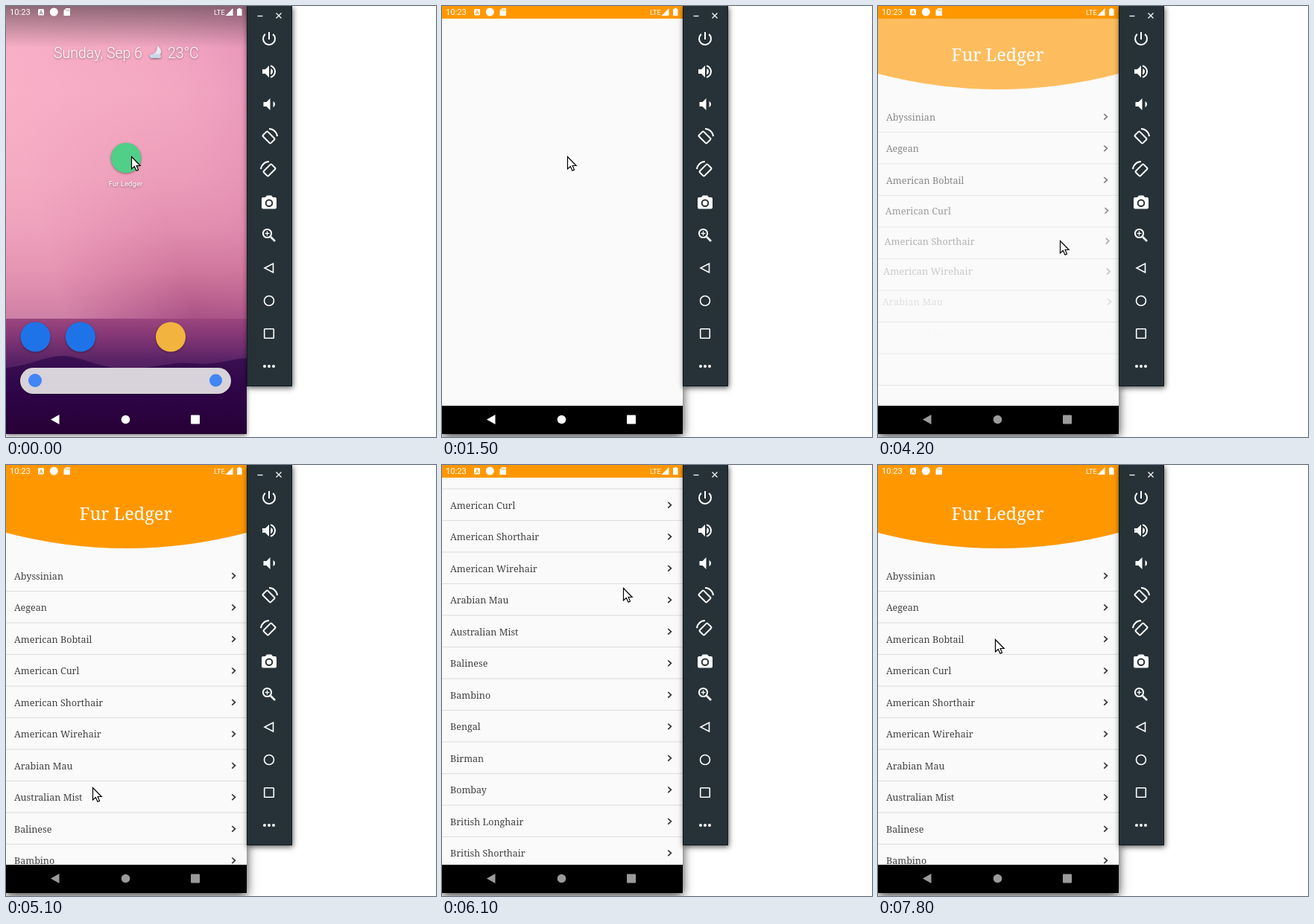
An HTML page with a canvas for the animation above (8000 ms loop, 577 by 579 pixels).

```html
<!DOCTYPE html>
<html lang="en">
<head>
<meta charset="utf-8">
<title>Breed list demo</title>
<style>
  html, body { margin: 0; width: 100%; height: 100%; overflow: hidden; background: #fff; }
  canvas { display: block; }
</style>
</head>
<body>
<canvas id="stage" width="577" height="579"></canvas>
<script>
const ctx = document.getElementById('stage').getContext('2d');
const LOOP = 8000, STEP = 100;
const W = 323, H = 575, BAR = 17, NAV = 537, ROW = 42.5;
const ORANGE = '#ff9800', PAPER = '#fafafa', SLATE = '#263238';
const TITLE = 'Fur Ledger';
const SANS = 'Roboto, sans-serif', SERIF = '"Noto Serif", serif';
const BREEDS = ['Abyssinian', 'Aegean', 'American Bobtail', 'American Curl', 'American Shorthair',
  'American Wirehair', 'Arabian Mau', 'Australian Mist', 'Balinese', 'Bambino', 'Bengal', 'Birman',
  'Bombay', 'British Longhair', 'British Shorthair', 'Burmese'];

// Keyframes: [time, value, ...]
const POINTER = [[1900, 168, 202], [2800, 244, 315], [4600, 244, 315], [5100, 116, 433],
  [5500, 116, 433], [5700, 190, 385], [6100, 243, 165], [6300, 243, 165],
  [6500, 235, 192], [7100, 163, 417], [7300, 163, 417], [7800, 157, 234]];
const SCROLL = [[5600, 0], [6100, 222.5], [6200, 224], [6300, 224], [7000, 0]];

const clamp = v => Math.max(0, Math.min(1, v));
const span = (t, from, to) => clamp((t - from) / (to - from));
const mix = (a, b, p) => a + (b - a) * p;
const smooth = p => p * p * (3 - 2 * p);
const easeOut = p => 1 - (1 - p) * (1 - p);

function track(keys, t) {
  let a = keys[0], b = a;
  for (const k of keys) {
    b = k;
    if (k[0] > t) break;
    a = k;
  }
  const p = a === b ? 0 : smooth(span(t, a[0], b[0]));
  return a.slice(1).map((v, i) => mix(v, b[i + 1], p));
}

// Cubic bezier (.4, 0, .2, 1)
function fastOutSlowIn(x) {
  let lo = 0, hi = 1;
  for (let i = 0; i < 20; i++) {
    const s = (lo + hi) / 2, r = 1 - s;
    if (3 * r * r * s * 0.4 + 3 * r * s * s * 0.2 + s * s * s < x) lo = s; else hi = s;
  }
  return lo * lo * (3 - 2 * lo);
}

function group(draw, x = 0, y = 0) {
  ctx.save();
  ctx.translate(x, y);
  draw();
  ctx.restore();
}
function rect(x, y, w, h, fill) {
  ctx.fillStyle = fill;
  ctx.fillRect(x, y, w, h);
}
function round(x, y, w, h, r) {
  ctx.beginPath();
  ctx.roundRect(x, y, w, h, r);
}
function disc(x, y, r, fill) {
  ctx.beginPath();
  ctx.arc(x, y, r, 0, 7);
  ctx.fillStyle = fill;
  ctx.fill();
}
function arc(x, y, r, from, to) {
  ctx.beginPath();
  ctx.arc(x, y, r, from * Math.PI / 180, to * Math.PI / 180);
  ctx.stroke();
}
function poly(pts, closed = true) {
  ctx.beginPath();
  for (let i = 0; i < pts.length; i += 2) ctx.lineTo(pts[i], pts[i + 1]);
  if (closed) ctx.closePath();
}
function fillPoly(...pts) { poly(pts); ctx.fill(); }
function line(...pts) { poly(pts, false); ctx.stroke(); }
function text(s, x, y, font, fill, align = 'left') {
  ctx.font = font;
  ctx.fillStyle = fill;
  ctx.textAlign = align;
  ctx.fillText(s, x, y);
}
function shade(color, blur, dx = 0, dy = 0) {
  ctx.shadowColor = color;
  ctx.shadowBlur = blur;
  ctx.shadowOffsetX = dx;
  ctx.shadowOffsetY = dy;
}
function gradient(x0, y0, x1, y1, stops) {
  const g = ctx.createLinearGradient(x0, y0, x1, y1);
  stops.forEach(([at, color]) => g.addColorStop(at, color));
  return g;
}

function wallpaper() {
  rect(0, 0, W, H, gradient(0, 0, 0, H, [[0, '#f2a6c1'], [0.2, '#f4a9c2'], [0.4, '#ea9bb7'],
    [0.52, '#de8aab'], [0.62, '#cb7097'], [0.7, '#ac5184'], [0.77, '#863776'], [0.83, '#572365'], [1, '#30094a']]));
  rect(0, 0, W, 420, gradient(0, 130, W, 40, [[0, 'rgba(255,185,205,.5)'], [0.5, 'rgba(255,180,205,.1)'],
    [1, 'rgba(205,110,165,.3)']]));
  rect(0, 0, W, 56, gradient(0, 0, 0, 56, [[0, 'rgba(60,50,55,.55)'], [1, 'rgba(60,50,55,0)']]));
  ctx.beginPath();
  ctx.moveTo(0, 486);
  ctx.bezierCurveTo(35, 482, 55, 470, 76, 470);
  ctx.bezierCurveTo(105, 471, 120, 486, 160, 487);
  ctx.bezierCurveTo(205, 487, 220, 477, 250, 480);
  ctx.bezierCurveTo(285, 483, 300, 474, W, 473);
  ctx.lineTo(W, H);
  ctx.lineTo(0, H);
  ctx.fillStyle = gradient(0, 470, 0, H, [[0, '#3b1152'], [0.4, '#30054a'], [1, '#260035']]);
  ctx.fill();
}

function weather() {
  ctx.beginPath();
  ctx.arc(200, 61, 8, -1.2, 2.6);
  ctx.quadraticCurveTo(203, 65, 203, 53.5);
  ctx.fillStyle = '#e3edf5';
  ctx.fill();
  round(193, 65, 15, 5, 2.5);
  ctx.fillStyle = '#c4d9e8';
  ctx.fill();
}

function launcher(pressed) {
  wallpaper();
  group(() => {
    shade('rgba(0,0,0,.4)', 3, 0, 1);
    text('Sunday, Sep 6', 64, 69.5, '300 19.5px ' + SANS, '#fff');
    text('23°C', 217, 69.5, '300 19.5px ' + SANS, '#fff');
    weather();
    text(TITLE, 160.5, 242, '9.6px ' + SANS, '#fff', 'center');
    disc(161, 204, 20.3, pressed ? '#44b876' : '#4fcf88');
    disc(39.5, 444.5, 20, '#1f73e8');
    disc(100, 444.5, 20, '#1f73e8');
    disc(221, 444.5, 20, '#f2b43e');
    round(19, 486, 283, 35, 17.5);
    ctx.fillStyle = '#d8d2da';
    ctx.fill();
  });
  disc(39, 503, 9, '#4285f4');
  disc(281.5, 503, 8.5, '#4285f4');
}

function statusBar(ink) {
  text('10:23', 5, 12.3, '11.2px ' + SANS, '#fff');
  round(43, 4, 8, 8.5, 1.5);
  ctx.fill();
  text('A', 47, 10.8, 'bold 7px ' + SANS, ink, 'center');
  disc(64.3, 8, 5.5, '#fff');
  fillPoly(80.5, 3, 86, 3, 86, 13, 77.5, 13, 77.5, 6);
  ctx.fillStyle = ink;
  for (const x of [80.2, 82.2, 84.2]) ctx.fillRect(x, 4.5, 0.9, 2.2);
  text('LTE', 279, 11.8, '9.4px ' + SANS, '#fff');
  fillPoly(304.5, 3, 304.5, 13, 294.5, 13);
  ctx.fillRect(310, 4, 6.5, 9);
  ctx.fillRect(311.8, 2.8, 3, 2);
}

function navIcons(t) {
  const gray = (from, to) => {
    const v = Math.round(mix(255, 155, span(t, from, to)));
    return `rgb(${v},${v},${v})`;
  };
  ctx.fillStyle = gray(1900, 2100);
  fillPoly(60, 555.5, 71.5, 549, 71.5, 562);
  disc(160.5, 555.5, 5.8, gray(1600, 1800));
  round(248, 549.5, 12, 12, 1);
  ctx.fill();
}

function spinner(ms) {
  const cycle = Math.floor(ms / 1000), r = ms / 1000 - cycle;
  const head = fastOutSlowIn(clamp(r * 2)), tail = fastOutSlowIn(clamp(r * 2 - 1));
  const start = -90 + tail * 270 + r * 306 - cycle * 144;
  ctx.strokeStyle = '#66757a';
  ctx.lineWidth = 3.1;
  arc(161.3, 277, 14.1, start, start + Math.max(2, (head - tail) * 270));
}

function breedRow(name, i, t, fade) {
  const p = span(t, 3810 + i * 55, 4085 + i * 55), k = mix(1.045, 1, p);
  const mid = 149 + i * ROW;
  group(() => {
    ctx.globalAlpha = fade;
    rect(0, mid + 20, W, 1, '#dcdcdc');
    ctx.globalAlpha = fade * p;
    ctx.translate(161.5, mid - 8 * (1 - p));
    ctx.scale(k, k);
    text(name, -150.5, 4.5, '12.55px ' + SERIF, '#424242');
    ctx.strokeStyle = '#333';
    ctx.lineWidth = 1.7;
    line(141.8, -4, 145.9, -0.2, 141.8, 3.6);
  });
}

function listPage(t) {
  const fade = easeOut(span(t, 3700, 5000));
  group(() => {
    ctx.beginPath();
    ctx.rect(0, BAR, W, NAV - BAR);
    ctx.clip();
    ctx.translate(0, -track(SCROLL, t)[0]);
    BREEDS.forEach((name, i) => breedRow(name, i, t, fade));
    ctx.globalAlpha = fade;
    ctx.beginPath();
    ctx.moveTo(0, BAR);
    ctx.lineTo(0, 91);
    ctx.quadraticCurveTo(W / 2, 133, W, 91);
    ctx.lineTo(W, BAR);
    ctx.fillStyle = ORANGE;
    ctx.fill();
    ctx.globalAlpha = 1;
    text(TITLE, 160.5, 74, '23.5px ' + SERIF, '#fff', 'center');
  });
}

function appWindow(t) {
  const p = smooth(span(t, 800, 1500));
  const x = mix(141, 0, p), y = mix(184, 0, p), w = mix(40, W, p), h = mix(40, H, p);
  group(() => {
    ctx.globalAlpha = span(t, 800, 1050);
    round(x, y, w, h, mix(20, 0, p));
    ctx.clip();
    rect(x, y, w, h, PAPER);
    rect(x, y, w, BAR * p, ORANGE);
    rect(x, y + h - (H - NAV) * p, w, (H - NAV) * p, '#000');
  });
  if (t >= 2200 && t < 3800) spinner(t - 2140);
  if (t >= 3800) listPage(t);
}

function phone(t) {
  group(() => {
    if (t < 800) shade('rgba(0,0,0,.55)', 6, 0, 2);
    else shade('rgba(0,0,0,.8)', 13, 0, 3);
    rect(0, 0, W, H, '#000');
  });
  if (t < 1500) launcher(t >= 800);
  if (t > 800) appWindow(t);
  statusBar(t < 1300 ? '#a07b8c' : ORANGE);
  navIcons(t);
}

function speaker() { fillPoly(-9, -3, -5, -3, 0, -8, 0, 8, -5, 3, -9, 3); }
function turnIcon(side) {
  ctx.scale(side, 1);
  arc(0, 0, 11, -90, -5);
  ctx.translate(-0.5, 0.5);
  ctx.rotate(-Math.PI / 4);
  round(-4.5, -7.5, 9, 15, 1.2);
  ctx.stroke();
}

const TOOLS = [
  () => { arc(0, 0, 8, -50, 230); line(0, -9, 0, 1); },
  () => {
    speaker();
    ctx.beginPath();
    ctx.arc(0.5, 0, 4.5, -1.1, 1.1);
    ctx.lineTo(2, 4);
    ctx.fill();
    arc(0, 0, 8, -75, 75);
  },
  () => {
    ctx.translate(1.5, 0);
    speaker();
    ctx.beginPath();
    ctx.arc(2, 0, 4.5, -1.1, 1.1);
    ctx.fill();
  },
  () => turnIcon(1),
  () => turnIcon(-1),
  () => {
    round(-10, -7, 20, 15.5, 2);
    ctx.fill();
    fillPoly(-6, -6, -3, -9.5, 3, -9.5, 6, -6);
    ctx.strokeStyle = SLATE;
    arc(0, 0.8, 4.3, 0, 360);
  },
  () => {
    arc(-2.5, -2.5, 5.6, 0, 360);
    ctx.lineWidth = 2.6;
    line(2, 2, 8, 8);
    ctx.lineWidth = 1.3;
    line(-5.5, -2.5, 0.5, -2.5);
    line(-2.5, -5.5, -2.5, 0.5);
  },
  () => { ctx.lineWidth = 1.6; poly([-6, 0, 5.5, -6, 5.5, 6]); ctx.stroke(); },
  () => { ctx.lineWidth = 1.6; arc(0, 0, 6.5, 0, 360); },
  () => { ctx.lineWidth = 1.6; round(-6.3, -6.3, 12.6, 12.6, 0.8); ctx.stroke(); },
  () => [-6, 0, 6].forEach(x => disc(x, 0, 2, '#fff'))
];

function toolbar() {
  group(() => {
    shade('rgba(0,0,0,.65)', 7, 1, 2);
    rect(323, 0, 61, 511, '#10181c');
  });
  rect(324, 0, 59, 510, SLATE);
  ctx.strokeStyle = '#fff';
  ctx.lineWidth = 1.3;
  line(337.5, 13.5, 344.5, 13.5);
  line(362.5, 9.5, 369.5, 16.5);
  line(369.5, 9.5, 362.5, 16.5);
  TOOLS.forEach((draw, i) => group(() => {
    ctx.fillStyle = ctx.strokeStyle = '#fff';
    ctx.lineWidth = 2;
    draw();
  }, 353, 44 + 44 * i));
}

function pointer(t) {
  const [x, y] = track(POINTER, t);
  group(() => {
    poly([0, 0, 0, 16.5, 3.8, 13, 6.5, 18.7, 9, 17.6, 6.6, 12, 11.7, 12]);
    ctx.fillStyle = '#fff';
    ctx.fill();
    ctx.strokeStyle = '#000';
    ctx.lineWidth = 1.2;
    ctx.stroke();
  }, x + 0.5, y + 0.5);
}

function draw(t) {
  rect(0, 0, 577, 579, '#fff');
  phone(t);
  toolbar();
  pointer(t);
}

const begin = performance.now();
function tick() {
  const t = (performance.now() - begin) % LOOP;
  draw(Math.floor(t / STEP) * STEP);
  requestAnimationFrame(tick);
}
tick();
</script>
</body>
</html>
```
